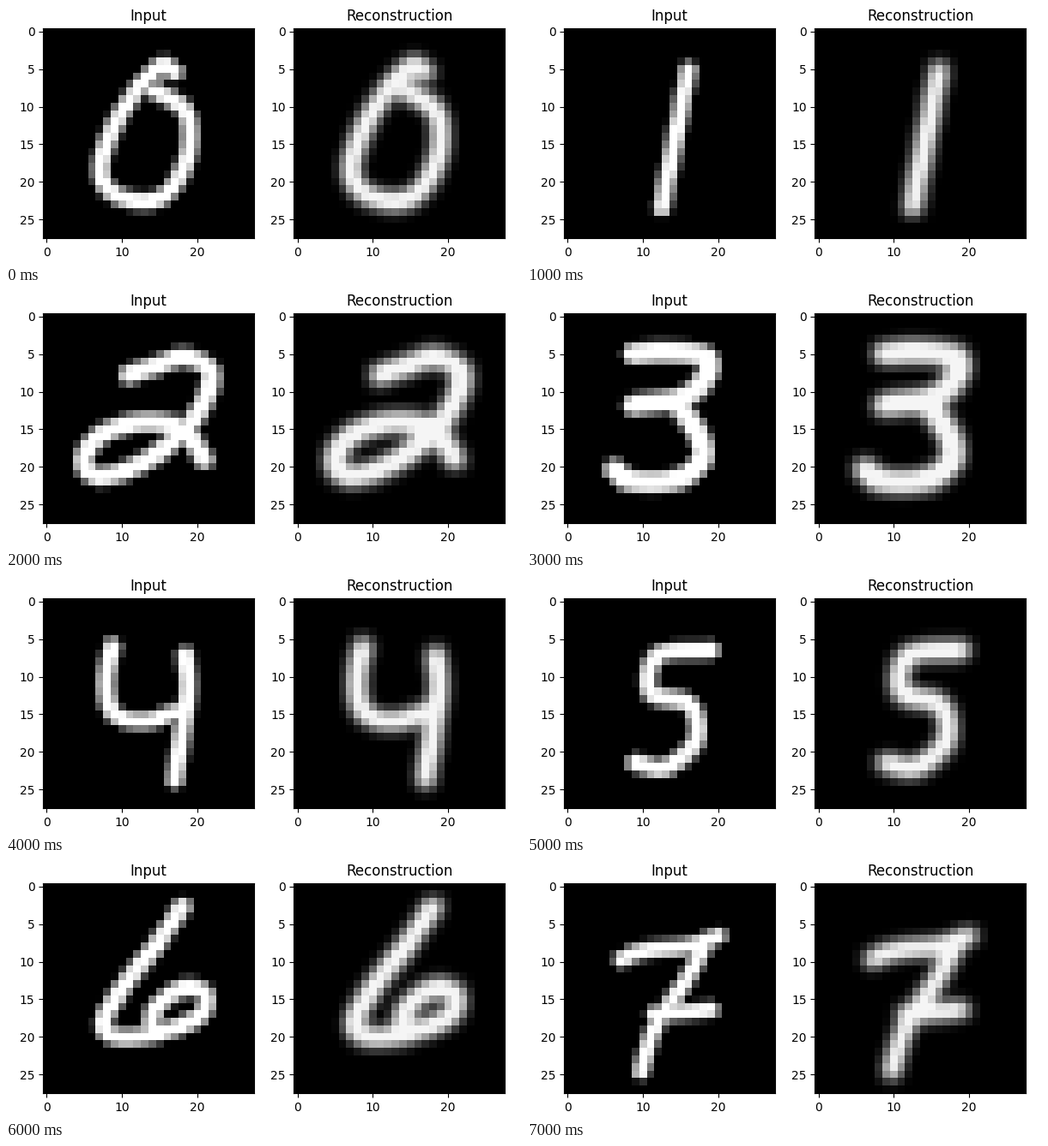
A matplotlib script that plays this animation: 600x300 px, repeating every 8000 ms.

```python
import numpy as np
import matplotlib.pyplot as plt
from matplotlib.animation import FuncAnimation

W, H, DPI = 600, 300, 100
SIDE, TOP = 245.45, 25.6      # panel size and offset in pixels
GRID = 28
YY, XX = np.mgrid[0:GRID, 0:GRID]


def spline(*points, steps=24):
    """Smooth Catmull-Rom stroke through a few (x, y) key points."""
    p = np.array(points, float)
    p = np.vstack([2 * p[0] - p[1], p, 2 * p[-1] - p[-2]])
    t = np.linspace(0, 1, steps)[:, None]
    return np.vstack([0.5 * (2 * b + (c - a) * t
                             + (2 * a - 5 * b + 4 * c - d) * t ** 2
                             + (3 * b - a - 3 * c + d) * t ** 3)
                      for a, b, c, d in zip(p, p[1:], p[2:], p[3:])])


def draw(radius, *strokes):
    """Pen strokes of one radius on the coarse grid, with soft edges."""
    x, y = np.vstack(strokes).T
    dist = np.hypot(XX[..., None] - x, YY[..., None] - y).min(axis=2)
    return np.clip(0.5 + (radius - dist) / 1.2, 0, 1)


def reconstruct(cells):
    """Blurred, slightly dimmer copy of a digit."""
    for axis in (0, 1):
        cells = (2 * cells + np.roll(cells, 1, axis)
                 + np.roll(cells, -1, axis)) / 4
    return np.clip(1.2 * cells, 0, 0.96)


zero = draw(1.1, spline((17, 5.4), (14.8, 4.8), (9.8, 11), (7.2, 18),
                        (9.2, 21.8), (15, 22.2), (18.6, 17), (18.5, 10.8),
                        (14.4, 7.9)))
one = draw(1.1, spline((16, 5.2), (12.5, 23.4)))
two = draw(1.25, spline((10.9, 7.8), (14.5, 6.6), (18.3, 5.5), (21.7, 7.3),
                        (20.8, 11.5), (17.8, 15.6), (12.5, 19.6), (7, 21.3),
                        (4.9, 19.2), (7.2, 15.8), (12.5, 14.1), (18, 15),
                        (20.9, 19)))
three = draw(1.4,
             spline((8.8, 5), (13, 4.8), (18, 5.3), (18.6, 7.5),
                    (15.5, 10.7), (8.8, 11.8)),
             spline((14.5, 11.6), (17.2, 15.5), (17.8, 19), (14.5, 21.7),
                    (8.5, 21.9), (6.2, 20.4)))
four = draw(1.1,
            spline((8.7, 6), (7.9, 11), (9, 15), (13, 15.9), (17, 14.8)),
            spline((18.4, 7.2), (18.7, 12), (17.7, 19), (17, 23.7)))
five = draw(1.15, spline((19, 6.5), (12, 7.2), (11, 12.1), (16.2, 13.8),
                         (17, 18.5), (13, 22.1), (9, 21.5)))
six = draw(1.15, spline((18, 2.7), (14.3, 8.1), (10.4, 13), (7.6, 17.9),
                        (9.2, 20), (14.5, 19.6), (20.2, 17.3), (21, 14.3),
                        (18, 13.6), (14.6, 16), (13.8, 18.7)))
seven = draw(1.05,
             spline((7.2, 9.7), (10, 8.6), (16, 8), (20, 6.6)),
             spline((18.4, 7.4), (15.8, 12.3), (11.7, 18.5), (9.7, 24.6)),
             spline((11.5, 17), (19, 16.4)))

DIGITS = [zero, one, two, three, four, five, six, seven]
fig = plt.figure(figsize=(W / DPI, H / DPI), dpi=DPI)


def panel(left, title):
    ax = fig.add_axes([left / W, 1 - (TOP + SIDE) / H, SIDE / W, SIDE / H])
    image = ax.imshow(zero, cmap="gray", vmin=0, vmax=1,
                      interpolation="nearest")
    ax.set_xticks([0, 10, 20])
    ax.set_yticks(range(0, 26, 5))
    ax.set_title(title)
    return image


source = panel(43.1, "Input")
result = panel(335.4, "Reconstruction")


def update(i):
    source.set_data(DIGITS[i])
    result.set_data(reconstruct(DIGITS[i]))
    return source, result


anim = FuncAnimation(fig, update, frames=len(DIGITS), interval=1000,
                     repeat=True, blit=False)
plt.show()
```
